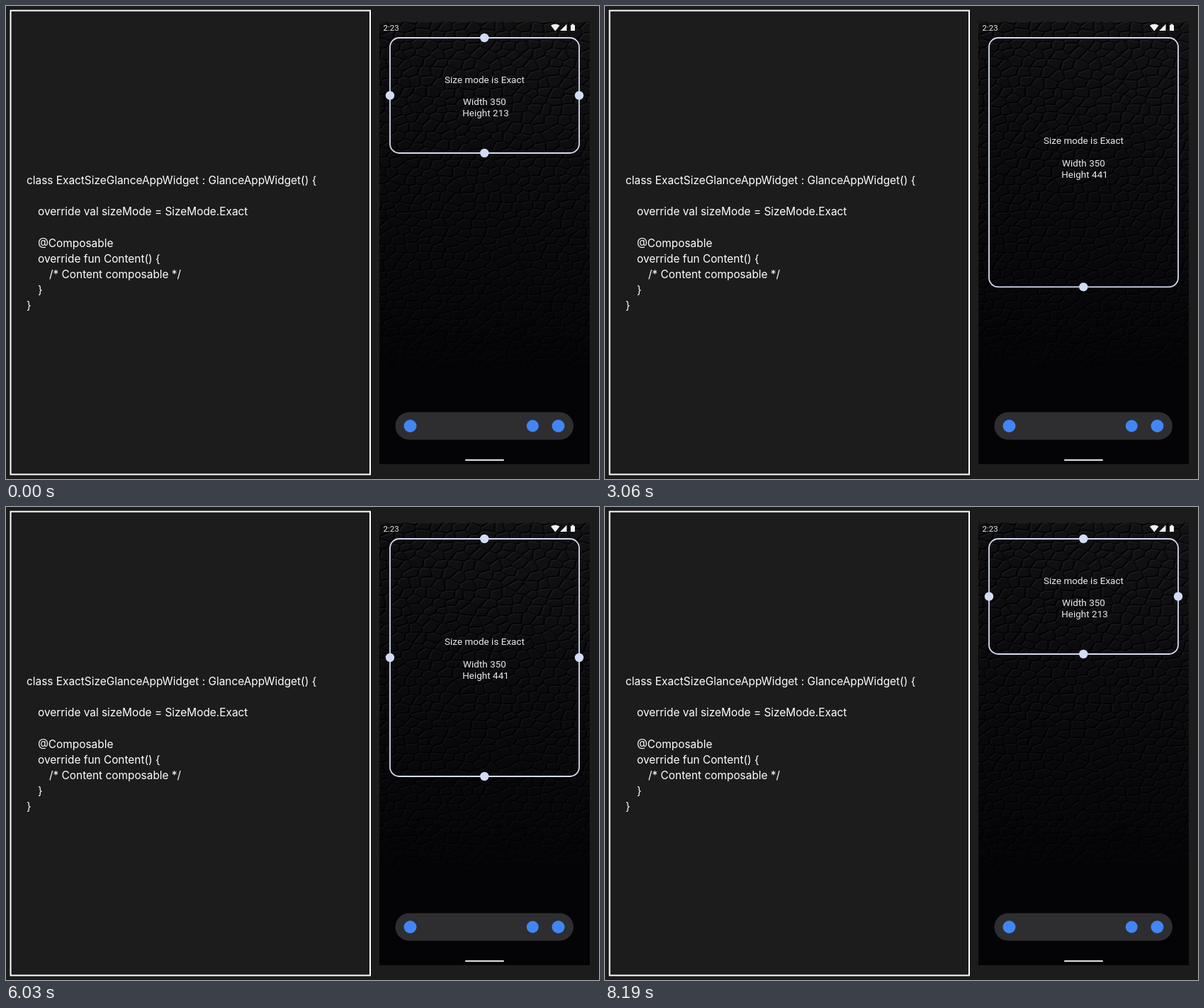
Animation of 837 by 669 pixels, one loop 8.37 s. Source, as an HTML page with a canvas:

```html
<!DOCTYPE html>
<html lang="en">
<head>
<meta charset="utf-8">
<title>Exact size widget</title>
<style>
  html, body { margin: 0; width: 100%; height: 100%; overflow: hidden; background: #1c1c1c; }
  canvas { position: absolute; left: 527px; top: 22px; }
  svg { position: absolute; left: 0; top: 0; }
  .code { font: 15.4px Inter, sans-serif; fill: #fff; white-space: pre; }
  .phone { font: 13.5px Roboto, sans-serif; fill: #e9e9ec; }
</style>
</head>
<body>
<canvas id="wallpaper" width="297" height="626"></canvas>
<svg width="837" height="669" viewBox="0 0 837 669">
  <rect x="6.5" y="6.5" width="507.5" height="656" fill="none" stroke="#fff" stroke-width="2"/>
  <g class="code">
    <text x="29" y="251.5">class ExactSizeGlanceAppWidget : GlanceAppWidget() {</text>
    <text x="45" y="296">override val sizeMode = SizeMode.Exact</text>
    <text x="45" y="340.5">@Composable</text>
    <text x="45" y="362.7">override fun Content() {</text>
    <text x="61" y="385">/* Content composable */</text>
    <text x="45" y="407">}</text>
    <text x="29" y="429">}</text>
  </g>

  <g fill="#f2f2f2">
    <text class="phone" x="532.5" y="35" style="font-size:11.5px">2:23</text>
    <path d="M769 27.5Q775.3 23.5 781.5 27.5L775.3 35.5ZM782 35L791.5 25.5V35ZM797 27H798.5V25.5H801.5V27H803V35H797Z"/>
    <rect x="648" y="641.3" width="55" height="2" rx="1"/>
  </g>

  <rect x="549.5" y="574.5" width="251.5" height="39" rx="19.5" fill="#2e2e30"/>
  <g fill="#4285f4">
    <circle cx="570.5" cy="594" r="9"/>
    <circle cx="743.3" cy="594" r="8.5"/>
    <circle cx="779.5" cy="594" r="9"/>
  </g>

  <g class="phone" id="label" text-anchor="middle">
    <text x="675.5" y="108.5">Size mode is Exact</text>
    <text x="675.5" y="140.3">Width 350</text>
    <text x="677" y="156.3" id="height"></text>
  </g>
  <rect id="frame" x="542" y="45" width="267" rx="13" fill="none" stroke="#d6dcf0" stroke-width="1.8"/>
  <g fill="#d3dcf5">
    <g id="idleHandles">
      <circle cx="675.3" cy="45" r="6.2"/>
      <circle class="side" cx="542" r="6.2"/>
      <circle class="side" cx="809" r="6.2"/>
    </g>
    <circle id="grip" cx="675.3" r="6.2"/>
  </g>
</svg>
<script>
const $ = id => document.getElementById(id);
const LOOP = 8370, STEP = 90, TOP = 45;

// [time, value] keys, joined by straight lines
const bottomKeys = [[360, 208], [1260, 271], [2340, 352], [3960, 454], [4140, 467],
  [5130, 467], [5670, 392], [5850, 381], [6300, 381], [7290, 276], [7740, 218], [7920, 208]];
const idleKeys = [[180, 1], [450, 0], [3960, 0], [4140, 1], [5040, 1], [5220, 0],
  [5670, 0], [5940, 1], [6210, 1], [6390, 0], [7740, 0], [8100, 1]];

// The layout snaps to a cell first; the printed height follows a little later
const cellKeys = [[0, 0], [1170, 1], [2340, 2], [3690, 3], [5580, 2], [6930, 1], [7650, 0]];
const heights = [213, 327, 441, 556];
const PRINT_LAG = 180;

function lerpKeys(keys, t) {
  if (t <= keys[0][0]) return keys[0][1];
  const i = keys.findIndex(key => key[0] > t);
  if (i < 0) return keys[keys.length - 1][1];
  const [t0, a] = keys[i - 1], [t1, b] = keys[i];
  return a + (b - a) * (t - t0) / (t1 - t0);
}

function cellAt(t) {
  return cellKeys.filter(key => key[0] <= Math.max(0, t)).pop()[1];
}

// Embossed leather: jittered cells lit from the upper left, fading downwards
function drawWallpaper() {
  const canvas = $('wallpaper'), ctx = canvas.getContext('2d');
  const { width, height } = canvas, image = ctx.createImageData(width, height);
  const random = (x, y, seed) => {
    const n = Math.sin(x * 127.1 + y * 311.7 + seed * 74.7) * 43758.5453;
    return n - Math.floor(n);
  };
  const relief = (x, y) => {
    const u = x / 18 + y / 160, v = y / 13.5 + y * y / 60000;
    const column = Math.floor(u), row = Math.floor(v);
    let near = 9, next = 9;
    for (let j = row - 1; j <= row + 1; j++) {
      for (let i = column - 1; i <= column + 1; i++) {
        const px = i + (j & 1) * .4 + random(i, j, 1) * .7;
        const py = j + .1 + random(i, j, 2) * .7;
        const d = Math.hypot(u - px, v - py);
        if (d < near) { next = near; near = d; }
        else if (d < next) next = d;
      }
    }
    return Math.min(1, (next - near) * 4);
  };
  const surface = new Float32Array(width * height);
  for (let y = 0; y < height; y++)
    for (let x = 0; x < width; x++) surface[y * width + x] = relief(x, y);
  for (let y = 0; y < height; y++) {
    const fade = Math.max(0, 1 - y / 500);
    for (let x = 0; x < width; x++) {
      const at = y * width + x, before = Math.max(0, at - width - 1);
      const slope = surface[at] - surface[before];
      const base = 4 + 11 * fade + 3 * fade * x / width;
      const level = base + slope * 20 * Math.sqrt(fade) - (1 - surface[at]) * 5 * fade;
      image.data.set([level, level, level + 2, 255], at * 4);
    }
  }
  ctx.putImageData(image, 0, 0);
}

function render(now) {
  const t = Math.floor(now % LOOP / STEP) * STEP;
  const bottom = lerpKeys(bottomKeys, t);
  $('frame').setAttribute('height', bottom - TOP);
  $('grip').setAttribute('cy', bottom);
  for (const side of document.querySelectorAll('.side')) side.setAttribute('cy', (TOP + bottom) / 2);
  $('idleHandles').setAttribute('opacity', lerpKeys(idleKeys, t));
  $('label').setAttribute('transform', `translate(0 ${cellAt(t) * 43.2})`);
  $('height').textContent = 'Height ' + heights[cellAt(t - PRINT_LAG)];
}

drawWallpaper();
const start = performance.now();
function tick() {
  render(performance.now() - start);
  requestAnimationFrame(tick);
}
tick();
</script>
</body>
</html>
```
